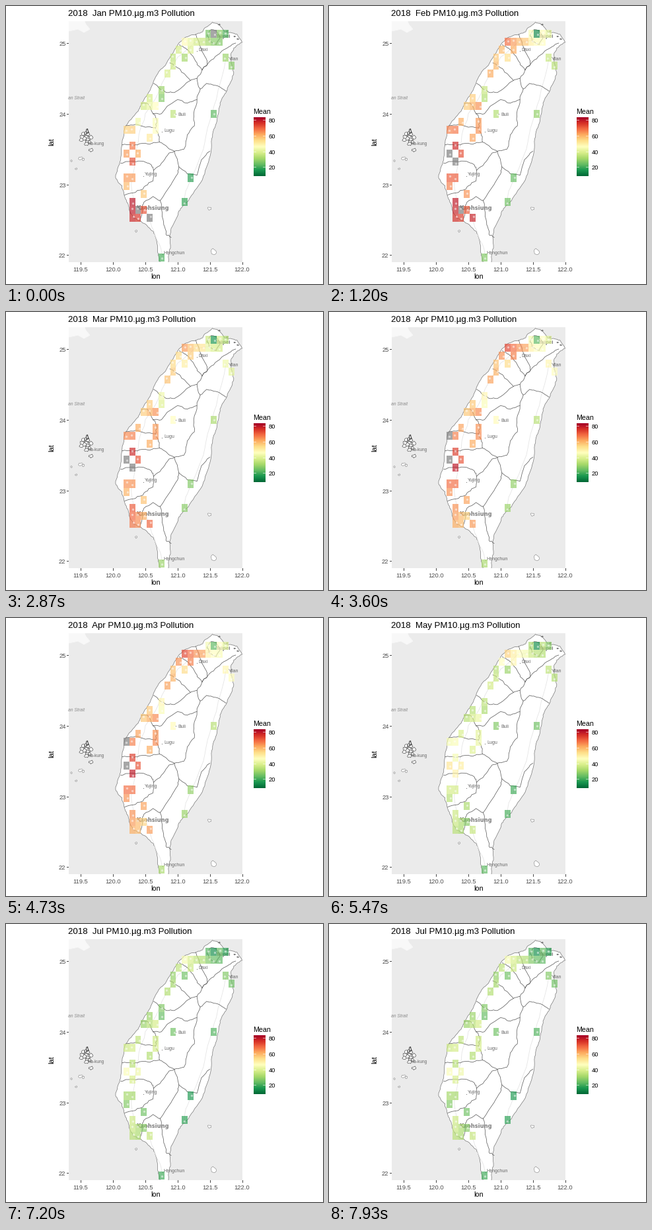
Recreate the animation shown at these times as a matplotlib script. Size 480x420 px, loop 8000 ms.

```python
import numpy as np
import matplotlib
import matplotlib.pyplot as plt
from matplotlib.animation import FuncAnimation
from matplotlib.collections import PolyCollection

matplotlib.rcParams["font.family"] = "Liberation Sans"

W, H, DPI = 480, 420, 60
LEFT, RIGHT, TOP, BOTTOM = 95, 357.5, 23, 387
FRAMES, INTERVAL, FRAMES_PER_MONTH = 40, 200, 6
MONTHS = ["Jan", "Feb", "Mar", "Apr", "May", "Jun", "Jul"]
LOW, HIGH = 8, 82
SCALE = matplotlib.colormaps["RdYlGn_r"]
rng = np.random.default_rng(7)


def pt(px):
    return px * 72 / DPI


def project(points):
    """Longitude and latitude to stage pixels."""
    lon, lat = np.array(points, float).T
    return np.column_stack([162 + (lon - 120) * 97.8, 56 + (25 - lat) * 106.8])


def roughen(points, amount=0.7, rounds=2):
    """Insert jittered midpoints so that a path looks surveyed."""
    for _ in range(rounds):
        mid = (points[:-1] + points[1:]) / 2
        mid += rng.uniform(-amount, amount, mid.shape)
        out = np.empty((len(points) + len(mid), 2))
        out[::2], out[1::2] = points, mid
        points = out
    return points


EAST_COAST = [
    (121.54, 25.295), (121.61, 25.28), (121.69, 25.21), (121.75, 25.15),
    (121.82, 25.15), (121.92, 25.125), (122.0, 25.01), (121.94, 24.98),
    (121.87, 24.93), (121.83, 24.86), (121.83, 24.75), (121.84, 24.7),
    (121.87, 24.58), (121.84, 24.48), (121.77, 24.36), (121.75, 24.3),
    (121.68, 24.2), (121.65, 24.1), (121.62, 23.97), (121.61, 23.9),
    (121.56, 23.78), (121.53, 23.65), (121.52, 23.48), (121.48, 23.32),
    (121.42, 23.15), (121.36, 23.03), (121.24, 22.87), (121.17, 22.77),
    (121.06, 22.67), (121.01, 22.6), (120.97, 22.5), (120.9, 22.38),
    (120.88, 22.25), (120.89, 22.1), (120.86, 22.0), (120.85, 21.88),
]
WEST_COAST = [
    (120.73, 21.88), (120.7, 22.0), (120.69, 22.1), (120.66, 22.25),
    (120.63, 22.33), (120.57, 22.38), (120.48, 22.45), (120.4, 22.49),
    (120.33, 22.52), (120.27, 22.6), (120.24, 22.7), (120.19, 22.8),
    (120.17, 22.88), (120.14, 22.98), (120.08, 23.03), (120.04, 23.1),
    (120.07, 23.22), (120.12, 23.35), (120.13, 23.48), (120.14, 23.58),
    (120.17, 23.75), (120.2, 23.83), (120.28, 23.92), (120.38, 24.03),
    (120.42, 24.1), (120.48, 24.2), (120.55, 24.3), (120.62, 24.43),
    (120.68, 24.55), (120.74, 24.63), (120.82, 24.7), (120.89, 24.81),
    (120.95, 24.9), (121.02, 25.0), (121.1, 25.07), (121.2, 25.11),
    (121.3, 25.13), (121.39, 25.16), (121.43, 25.22), (121.54, 25.295),
]
NORTH_BORDERS = [
    [(121.28, 25.12), (121.33, 25.02), (121.4, 24.85), (121.46, 24.7), (121.38, 24.62)],
    [(121.03, 24.98), (121.12, 24.93), (121.2, 24.85), (121.3, 24.72), (121.38, 24.62)],
    [(120.88, 24.72), (121.0, 24.65), (121.1, 24.57), (121.2, 24.47), (121.3, 24.5)],
    [(120.63, 24.43), (120.73, 24.35), (120.83, 24.3), (120.95, 24.3), (121.1, 24.4), (121.2, 24.47)],
    [(121.38, 24.62), (121.52, 24.76), (121.65, 24.85), (121.8, 24.95), (121.9, 25.0)],
    [(121.38, 24.62), (121.3, 24.5), (121.35, 24.35), (121.45, 24.43), (121.6, 24.4), (121.75, 24.32)],
    [(121.46, 25.1), (121.5, 25.18), (121.6, 25.18), (121.66, 25.08), (121.6, 24.98),
     (121.5, 25.02), (121.46, 25.1)],
    [(120.44, 24.14), (120.53, 24.15), (120.62, 24.0)],
    [(120.62, 24.0), (120.75, 24.0), (120.88, 24.13), (121.0, 24.2), (121.15, 24.15),
     (121.3, 24.2), (121.35, 24.35)],
]
SOUTH_BORDERS = [
    [(120.62, 24.0), (120.68, 23.9), (120.66, 23.8), (120.7, 23.7), (120.72, 23.6)],
    [(120.2, 23.83), (120.35, 23.85), (120.5, 23.81), (120.66, 23.8)],
    [(120.14, 23.56), (120.3, 23.55), (120.45, 23.58), (120.6, 23.58), (120.72, 23.6),
     (120.85, 23.52), (120.95, 23.47)],
    [(120.12, 23.3), (120.28, 23.33), (120.45, 23.33), (120.6, 23.27), (120.63, 23.2)],
    [(120.63, 23.2), (120.75, 23.3), (120.85, 23.42), (120.95, 23.47)],
    [(120.63, 23.2), (120.62, 23.05), (120.5, 22.98), (120.42, 22.92), (120.3, 22.88), (120.18, 22.85)],
    [(120.42, 22.5), (120.45, 22.65), (120.48, 22.75), (120.62, 22.83), (120.73, 22.77)],
    [(120.73, 22.77), (120.9, 23.0), (121.0, 23.15), (121.02, 23.25), (120.95, 23.47)],
    [(120.73, 22.77), (120.76, 22.55), (120.8, 22.4), (120.83, 22.28), (120.9, 22.25)],
    [(121.02, 23.25), (121.15, 23.15), (121.3, 23.13), (121.37, 23.35), (121.5, 23.47)],
    [(121.3, 24.2), (121.25, 24.0), (121.26, 23.83), (121.15, 23.7), (121.1, 23.5), (120.95, 23.47)],
]
ROADS = [
    [(121.52, 25.05), (121.25, 25.0), (121.0, 24.8), (120.8, 24.5), (120.65, 24.2), (120.5, 24.0),
     (120.4, 23.7), (120.33, 23.3), (120.28, 23.0), (120.33, 22.65)],
    [(121.75, 24.8), (121.6, 24.2), (121.5, 23.9), (121.4, 23.5), (121.15, 22.95), (121.1, 22.75)],
    [(120.5, 22.65), (120.6, 22.4), (120.72, 22.15), (120.76, 22.0)],
]

# Each region: monthly means, then tiles as (column, row, offset from the mean).
TAIPEI = ([27, 46, 38, 45, 33, 26, 23],
          [(14, 0, -2), (16, 0, 0), (17, 0, -6), (14, 1, 3), (15, 1, 0), (16, 1, -1)])
DOWNTOWN = ([20, 13, 15, 22, 14, 13, 14], [(15, 0, 0)])
TAOYUAN = ([39, 60, 55, 65, 47, 38, 36],
           [(10, 1, 7), (11, 1, 2), (12, 1, -2), (13, 1, -4), (9, 2, -2), (11, 2, 0)])
HSINCHU = ([36, 58, 55, 59, 35, 29, 30], [(8, 3, -2), (8, 4, 0), (7, 5, 2), (10, 3, -6)])
HILLS = ([28, 34, 41, 46, 33, 23, 25], [(17, 3, 1), (18, 4, -1), (6, 7, 1), (6, 8, -2)])
BULI = ([34, 32, 45, 46, 26, 24, 24], [(8, 10, 0)])
TAICHUNG = ([42, 60, 60, 61, 38, 33, 34],
            [(4, 8, -5), (3, 9, -5), (4, 9, -1), (5, 9, 3), (2, 11, 0), (5, 11, 2), (5, 12, 3)])
YUNLIN = ([56, 67, 66, 66, 45, 45, 38],
          [(0, 12, -2), (1, 12, -1), (4, 13, -6), (0, 15, 6), (2, 15, 4)])
CHIAYI = ([68, 78, 78, 75, 45, 41, 35], [(1, 14, -2), (1, 16, 3)])
TAINAN = ([61, 68, 62, 66, 36, 38, 29], [(0, 18, 1), (1, 18, 1), (0, 19, -3), (3, 20, -5)])
KAOHSIUNG = ([76, 75, 66, 60, 33, 34, 33],
             [(1, 21, 3), (1, 22, 2), (2, 22, -2), (3, 22, -6), (1, 23, 0), (2, 23, -2), (4, 23, 2)])
EAST = ([19, 25, 28, 30, 21, 18, 18], [(15, 10, 3), (11, 18, -2), (10, 21, -1), (6, 28, 1)])
REGIONS = [TAIPEI, DOWNTOWN, TAOYUAN, HSINCHU, HILLS, BULI,
           TAICHUNG, YUNLIN, CHIAYI, TAINAN, KAOHSIUNG, EAST]
NO_DATA = {(15, 0): [0], (4, 23): [0], (2, 22): [0, 1], (0, 12): [3],
           (0, 15): [1, 2, 3], (1, 16): [1, 2]}
TILE_W, TILE_H = 8.83, 12.08


def tile_color(tile, means, month):
    col, row, offset = tile
    if month in NO_DATA.get((col, row), []):
        return (0.5, 0.5, 0.5, 0.7)
    return SCALE((means[month] + offset - LOW) / (HIGH - LOW), alpha=0.68)


TILES = [(tile, means) for means, tiles in REGIONS for tile in tiles]
COLORS = [[tile_color(t, m, i) for t, m in TILES] for i in range(len(MONTHS))]

fig = plt.figure(figsize=(W / DPI, H / DPI), dpi=DPI, facecolor="white")
page = fig.add_axes([0, 0, 1, 1])
page.axis("off")
area = fig.add_axes([LEFT / W, 1 - BOTTOM / H, (RIGHT - LEFT) / W, (BOTTOM - TOP) / H],
                    facecolor="#ebebeb")
area.set(xlim=(LEFT, RIGHT), ylim=(BOTTOM, TOP), xticks=[], yticks=[])
for spine in area.spines.values():
    spine.set_visible(False)


def island(x, y, rx, ry, color="#888888", width=0.6):
    angle = np.linspace(0, 2 * np.pi, 12)
    r = rng.uniform(0.5, 1.1, 12)
    r[-1] = r[0]
    area.fill(x + rx * r * np.cos(angle), y + ry * r * np.sin(angle),
              fc="white", ec=color, lw=pt(width))


# Base map
area.fill([95, 119, 121, 127, 118, 109, 95], [23, 23, 28, 35, 40, 35, 38], color="#f8f8f8")
coast = roughen(project(EAST_COAST + WEST_COAST))
area.fill(*coast.T, fc="white", ec="#777777", lw=pt(0.7))
for road in ROADS:
    area.plot(*roughen(project(road), 1.2).T, color="#e4e4e4", lw=pt(0.8))
for border in NORTH_BORDERS + SOUTH_BORDERS:
    area.plot(*roughen(project(border), 1.1).T, color="#5e5e5e", lw=pt(0.75))

for _ in range(16):
    island(rng.normal(123, 5.5), rng.normal(203, 6), 3.5, 3, "#555555", 0.7)
island(123, 189, 1.5, 4, "#333333", 1)
for x, y, rx, ry in [(113, 230, 4, 2.5), (117, 232, 2, 2), (99, 234, 1.5, 1.5), (106, 246, 2, 1.5),
                     (197, 340, 2, 2), (308, 306, 3, 3), (314, 371, 5, 4.5)]:
    island(x, y, rx, ry)
for x, y in [(323, 28), (335, 38), (346, 46), (351, 50)]:
    island(x, y, 1.5, 1, "#444444")


def place(x, y, name, size=7, color="#666666", **style):
    area.text(x, y, name, size=pt(size), color=color, va="center_baseline", **style)


place(329, 46, "Taipei", 8, "#777777", weight="bold", ha="center")
place(291, 65.5, "Daxi")
place(337, 79.5, "Yilan")
place(260, 163.5, "Buli")
place(239, 187.5, "Lugu")
place(210, 254, "Yujing")
place(238, 372.5, "Hengchun")
place(124, 207, "Ma-kung", 6.5)
place(197, 305, "Kaohsiung", 8.4, "#808080", weight="bold", family="DejaVu Sans")
place(119, 138.5, "an Strait", 6.8, "#8a8a8a", style="italic", ha="right")
area.plot([288.5, 236, 207.5, 236.5, 257], [68.5, 190.5, 256.5, 375, 163], ".",
          ms=pt(2.2), color="#666666", mew=0)

# Measured tiles and their stations
boxes, stations = [], []
for (col, row, _), _ in TILES:
    x, y = 178 + TILE_W * col, 36 + TILE_H * row
    boxes.append([(x, y), (x + TILE_W, y), (x + TILE_W, y + TILE_H), (x, y + TILE_H)])
    stations.append((x + rng.uniform(3, 6.5), y + rng.uniform(3.5, 8.5)))
tiles = PolyCollection(boxes, facecolors=COLORS[0], linewidths=0, zorder=5)
area.add_collection(tiles, autolim=False)
area.plot(*np.array(stations).T, "o", ms=pt(3.4), color="white", alpha=0.5, mew=0, zorder=6)

# Axes, title and legend
for i in range(6):
    x = 113 + 48.9 * i
    page.plot([x, x], [BOTTOM, BOTTOM + 3], color="#333333", lw=pt(0.9))
    page.text(x, 397.2, f"{119.5 + i / 2:.1f}", size=pt(9.4), color="#4d4d4d",
              ha="center", va="center_baseline")
for i in range(4):
    y = 56 + 106.8 * i
    page.plot([LEFT - 3, LEFT], [y, y], color="#333333", lw=pt(0.9))
    page.text(90.5, y + 0.4, str(25 - i), size=pt(9.4), color="#4d4d4d",
              ha="right", va="center_baseline")
page.text(226.5, 412.5, "lon", size=pt(10.8), ha="center", va="baseline")
page.text(74, 205, "lat", size=pt(10.8), ha="right", va="center", rotation=90)
title = page.text(94.5, 15, "", size=pt(13.2), va="baseline")

page.text(374.5, 163, "Mean", size=pt(10.6), va="baseline")
page.imshow(np.linspace(1, 0, 256)[:, None], cmap=SCALE, extent=(375, 392.3, 257.5, 169),
            aspect="auto", interpolation="bilinear")
for value in (20, 40, 60, 80):
    y = 172 + (80 - value) * 1.19
    for x in (375, 388.9):
        page.plot([x, x + 3.4], [y, y], color="white", lw=pt(0.6))
    page.text(397.5, y + 0.4, str(value), size=pt(9.4), va="center_baseline")
page.set(xlim=(0, W), ylim=(H, 0))


def update(frame):
    month = frame // FRAMES_PER_MONTH
    title.set_text(f"2018  {MONTHS[month]} PM10.\u00b5g.m3 Pollution")
    tiles.set_facecolor(COLORS[month])
    return title, tiles


animation = FuncAnimation(fig, update, frames=FRAMES, interval=INTERVAL, repeat=True, repeat_delay=0)
plt.show()
```
